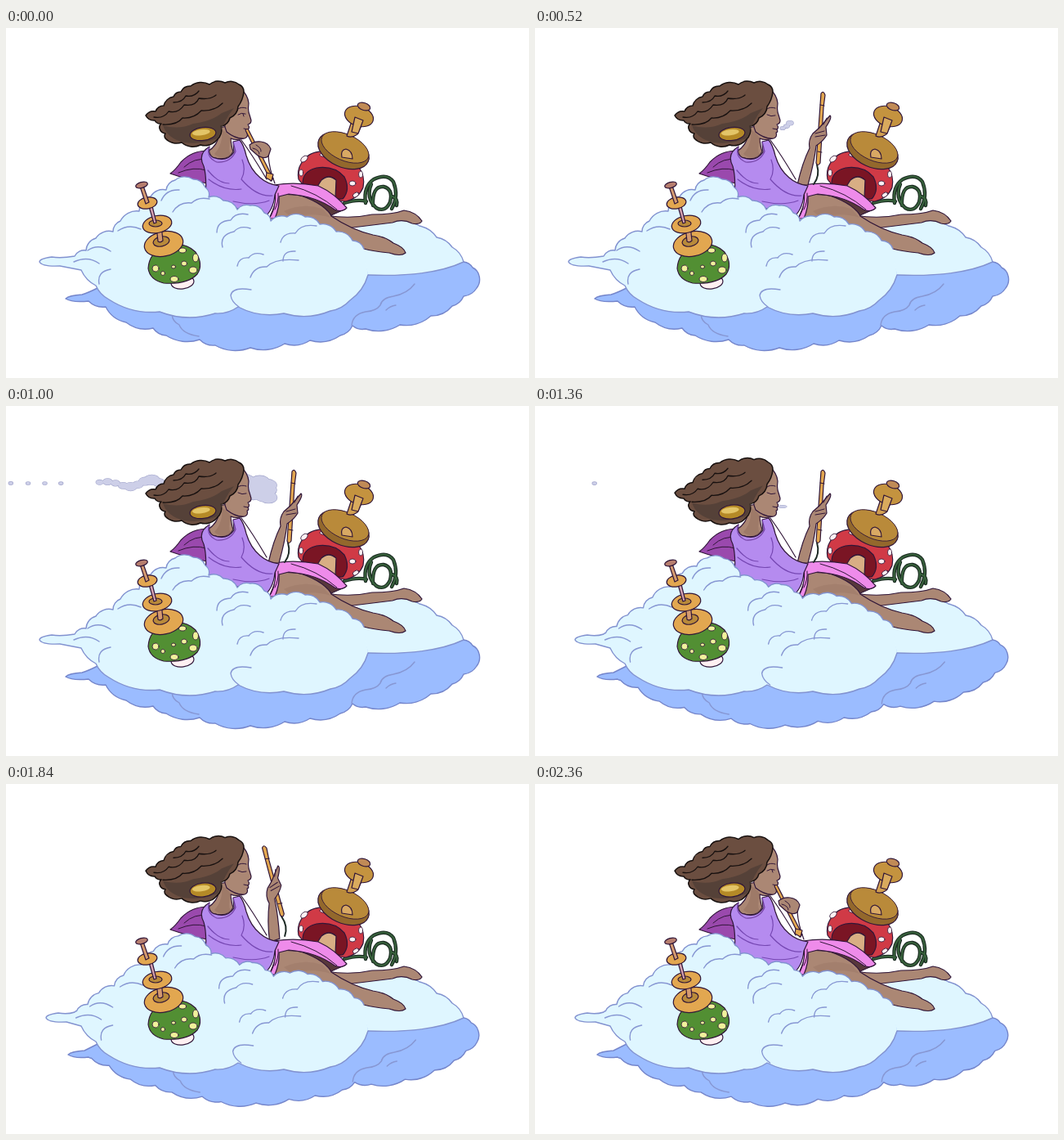
Write an HTML page that moves like this. It is 640 px wide and 428 px high and loops after 2400 ms.

```html
<!DOCTYPE html>
<html lang="en">
<head>
<meta charset="utf-8">
<title>Dreaming on a cloud</title>
<style>
html, body { margin: 0; width: 100%; height: 100%; overflow: hidden; background: #fff; }
svg { display: block; width: 640px; height: 428px; }
path, ellipse { stroke-linejoin: round; stroke-linecap: round; }
.ink { stroke: #301638; stroke-width: 1.2; }
.line { fill: none; stroke: #301638; stroke-width: 1; }
.light { fill: #dff6ff; stroke: #8292d0; stroke-width: 1.4; }
.shade { fill: #9bbcff; stroke: #7586cb; stroke-width: 1.4; }
.fold { fill: none; stroke: #8797d3; stroke-width: 1.4; }
.skin { fill: #ab8774; }
.dusk { fill: #8c6757; }
.gold { fill: #e2a750; }
.brass { fill: #b98a3a; }
.white { fill: #fff0f2; }
.hair { fill: #6b4e40; stroke: #17100f; stroke-width: 1.5; }
</style>
</head>
<body>
<svg viewBox="0 0 640 428">
  <path id="smokeEdge" fill="#a2a5cb"/>
  <path id="smoke" fill="#cdcfe8"/>

  <path id="shade" class="shade"/>
  <path id="shadeFold" class="fold" d="M204 347q-3 10 8 16q4 11 24 14M423 364q1-14 17-17q13-1 18-8q2-9 16-11q17-3 26-15M465 345q5-5 12-6"/>
  <path id="back" class="light"/>

  <!-- hose coil -->
  <g fill="none" stroke="#1b2b22" stroke-width="4.4">
    <path id="coil" d="M414 214Q430 209 441 212M440 214Q437 194 450 185Q466 177 474 188Q481 205 472 221M449 217Q448 193 462 194Q474 197 470 213Q464 226 453 220Q440 208 447 191M473 206Q480 209 478 217"/>
    <use href="#coil" stroke="#37603b" stroke-width="2.2"/>
  </g>

  <!-- red mushroom pipe -->
  <g class="ink">
    <path d="M358 185Q356 174 361 166Q370 150 390 151Q417 154 431 169Q440 181 437 195Q432 208 416 212Q376 211 358 185Z" fill="#d03a46"/>
    <path d="M363 190Q363 175 380 171Q402 168 414 182Q422 198 412 209Q380 211 363 190Z" fill="#7a1524"/>
    <path d="M379 197L386 186Q395 178 404 186L403 208Z" fill="#d8ae84"/>
    <g class="white" stroke-width=".8">
      <ellipse cx="365" cy="160" rx="5" ry="3" transform="rotate(-40 365 160)"/>
      <ellipse cx="390" cy="155" rx="6" ry="2.5"/>
      <ellipse cx="421" cy="167" rx="5" ry="3.5" transform="rotate(35 421 167)"/>
      <ellipse cx="434" cy="179" rx="2.5" ry="4"/>
      <ellipse cx="424" cy="190" rx="4" ry="3"/>
      <ellipse cx="361" cy="177" rx="2.5" ry="4"/>
      <ellipse cx="428" cy="204" rx="4" ry="2.5" transform="rotate(-35 428 204)"/>
    </g>
    <ellipse cx="413" cy="150" rx="33" ry="20" transform="rotate(24 413 150)" fill="#93682c"/>
    <ellipse cx="415" cy="146" rx="31" ry="16" transform="rotate(24 415 146)" class="brass" stroke-width=".8"/>
    <path d="M411 158Q409 149 416 148Q424 150 424 160Z" fill="#d9a963"/>
    <path d="M417 132L424 111L437 115L430 130Q423 135 417 132Z" fill="#d2a052"/>
    <ellipse cx="432" cy="108" rx="18" ry="12" transform="rotate(18 432 108)" fill="#c4933f"/>
    <path d="M423 127L427 109L437 113L431 129Z" fill="#d9aa5d"/>
    <ellipse cx="438" cy="96" rx="8" ry="4.5" transform="rotate(18 438 96)" fill="#c08a56"/>
  </g>

  <!-- dreamer -->
  <g class="ink">
    <path d="M247 150Q227 150 214 164Q207 174 201 178Q224 186 246 190Z" fill="#9a49ad"/>
    <path d="M218 170Q231 158 246 161M211 177Q230 169 245 174" class="line"/>
    <path d="M392 229Q421 234 448 228Q474 228 487 223Q502 225 509 236Q506 241 497 239Q485 233 473 238L416 245Z" class="skin"/>
    <path d="M323 231Q330 215 333 204Q349 202 367 206Q390 211 398 230Q423 247 449 253Q464 255 474 263Q487 268 489 275Q483 280 469 275Q449 273 438 270L395 250L345 242Z" class="skin"/>
    <path d="M340 224Q363 213 387 221L397 232Q377 225 349 231Z" class="dusk" stroke="none" opacity=".25"/>
    <path d="M354 203Q390 200 414 222L398 229Q386 212 354 203Z" fill="#57383a"/>
    <path d="M322 233Q333 216 328 192Q354 188 382 193Q402 202 417 220Q411 226 402 222Q381 206 346 203L334 206Q335 219 329 233Z" fill="#ee8bea"/>
    <path d="M349 193Q381 201 405 222M329 222Q334 212 333 202" class="line"/>
    <path d="M261 122L295 115L291 135Q281 138 275 135Q276 146 278 151Q272 164 252 158L247 151Q262 142 261 122Z" class="skin"/>
    <path d="M264 124Q274 130 276 138Q270 146 276 158Q260 160 255 154Q266 142 264 124Z" class="dusk" stroke="none" opacity=".4"/>
    <path d="M288 75Q296 82 297 92Q296 98 297 103Q299 109 300 113Q300 117 296 118Q299 122 296 124Q298 127 295 128Q297 133 292 135Q281 136 270 127Q264 115 273 103Z" class="skin"/>
    <path d="M291 123L296 124M284 99Q288 96 294 98" class="line"/>
    <path id="eyeOpen" d="M284 106Q288 103 293 105M290 105L291 108" class="line"/>
    <path id="eyeShut" d="M284 106Q289 109 294 107" class="line"/>
  </g>

  <g id="armOut" class="ink">
    <path d="M341 191Q349 181 345 167" fill="none" stroke="#1c2a25" stroke-width="2"/>
    <path d="M350 80Q353 76 355 82L353 97L349 165Q346 170 344 165L349 94Z" class="gold"/>
    <path d="M321 192Q327 165 336 147Q334 137 340 129L348 122L361 107Q364 109 356 121L357 131Q353 138 344 144Q342 163 334 192Z" class="skin"/>
    <path d="M343 129L354 126M343 133L355 131M353 118L357 110M349 94L354 95M346 151L351 152" class="line"/>
  </g>
  <g id="armIn" class="ink">
    <path d="M293 125Q295 122 297 125L327 184L324 187Z" class="gold"/>
    <path d="M298 143Q304 138 312 139Q321 140 324 148L321 157Q315 161 307 155L299 148Z" class="skin"/>
    <path d="M306 143Q313 147 312 151M302 147Q310 149 310 154" class="line"/>
    <path d="M321 156Q322 172 329 190" fill="none"/>
    <path d="M319 177L327 179L325 187L318 183Z" class="gold"/>
  </g>

  <g class="ink">
    <path d="M249 145Q234 154 242 169Q246 183 244 207L315 232Q327 224 329 204L334 193Q320 191 311 183Q299 173 294 156Q291 143 286 137L278 139L279 152Q270 165 253 158Q247 154 249 145Z" fill="#b58bef"/>
    <path d="M249 145Q244 158 258 164Q275 165 281 151L278 139" fill="none" stroke="#7443a6"/>
    <path d="M248 185Q267 200 288 197M247 174Q260 190 273 190M289 161Q294 174 288 185Q307 207 326 205M278 212Q304 218 322 211" fill="none" stroke="#7647b3"/>
    <path d="M288 137Q302 156 319 185" fill="none"/>
  </g>

  <path id="hair" class="hair"/>
  <g id="strands">
    <path d="M192 119Q211 125 229 117Q252 114 264 104L279 98Q267 112 260 134Q242 143 218 140Q197 135 192 119Z" fill="#4c3c35" opacity=".7"/>
    <path d="M181 109Q193 111 199 102Q211 105 218 94Q232 96 236 86Q250 88 257 82M192 118Q209 119 216 110Q230 111 239 101Q255 102 265 92M205 91Q216 91 220 83Q230 85 236 77" fill="none" stroke="#17100f" stroke-width="1.3"/>
  </g>
  <g id="ring">
    <ellipse rx="16" ry="8" class="ink" fill="#b58a27"/>
    <ellipse cx="-2" cy="-2" rx="11" ry="3.5" fill="#e3c568"/>
  </g>

  <path id="front" class="light"/>
  <path id="wisps" class="light"/>
  <path id="folds" class="fold" d="M190 211q6-14 22-13M204 225q8-13 23-11q8-8 22-5M258 250q0-14 17-15q6-10 21-7M265 268q-4-15 14-19q7-8 20-4M283 291q2-11 14-10q6-8 18-4M299 305q5-14 20-13q11-11 39-8M336 262q3-12 18-11q7-12 26-9M339 285q0-13 15-12M300 320q-23-4-25 7q1 8 10 14M137 248q13-9 28-2M100 272q13-9 28 1M83 286q17-8 31 2M114 313q-3-15 14-18"/>

  <!-- green mushroom pipe -->
  <g class="ink" stroke-width="1.5">
    <ellipse cx="216" cy="311" rx="14" ry="8" class="white" transform="rotate(-8 216 311)"/>
    <path d="M174 294Q175 275 194 267Q218 260 232 274Q242 289 234 301Q222 314 193 312Q176 308 174 294Z" fill="#528f33"/>
    <g fill="#f0f19b" stroke-width=".8">
      <ellipse cx="183" cy="294" rx="4" ry="4"/><ellipse cx="205" cy="292" rx="2.5" ry="2"/>
      <ellipse cx="218" cy="288" rx="3.5" ry="3"/><ellipse cx="232" cy="281" rx="3.5" ry="5"/>
      <ellipse cx="229" cy="296" rx="5" ry="4"/><ellipse cx="206" cy="307" rx="5" ry="3.5"/>
      <ellipse cx="192" cy="300" rx="2.5" ry="2.5"/><ellipse cx="216" cy="272" rx="4.5" ry="3"/>
    </g>
    <ellipse cx="193" cy="264" rx="24" ry="15" class="gold" transform="rotate(-12 193 264)"/>
    <ellipse cx="190" cy="261" rx="10" ry="6" class="brass" transform="rotate(-12 190 261)"/>
    <path d="M184 242L190 241L192 260Q189 263 186 261Z" fill="#d49a70"/>
    <ellipse cx="185" cy="240" rx="18" ry="10.5" class="gold" transform="rotate(-12 185 240)"/>
    <ellipse cx="183" cy="239" rx="8" ry="4" class="brass"/>
    <path d="M174 215L178 214L184 238L181 239Z" fill="#d6a2b0"/>
    <ellipse cx="173" cy="214" rx="12" ry="7" class="gold" transform="rotate(-10 173 214)"/>
    <path d="M164 194L168 193L175 213L171 215Z" fill="#d49a70"/>
    <ellipse cx="166" cy="192" rx="7.5" ry="3.5" fill="#b77e6e" transform="rotate(-15 166 192)"/>
  </g>
</svg>
<script>
const $ = id => document.getElementById(id);
const pairs = s => s.split(' ').map(p => p.split(',').map(Number));

const edge = {
  back: pairs('560,286 546,268 527,256 506,242 472,236 430,238'),
  top: pairs('438,270 424,260 404,249 384,240 366,231 344,231 324,236 316,226 299,217 283,222 266,211 248,207 244,195 229,185 207,186 196,198 177,206 163,224 140,236 131,249 110,257 98,272 84,279'),
  low: pairs('92,296 110,315 126,332 188,347 256,349 284,341 340,349 397,346 421,333 443,302'),
  base: pairs('101,334 122,341 147,360 180,367 196,376 237,381 256,388 299,391 341,386 372,382 409,376 424,364 440,368 482,363 520,352 546,340 560,328 576,318 579,303 571,293 560,286'),
  hair: pairs('291,78 285,69 268,67 249,69 226,71 214,78 205,84 193,95 183,102 171,107 182,113 190,117 188,123 195,129 195,135 215,140 238,143 258,137 263,120 274,110 284,96')
};

// Six drawings, each held for 80 ms
const tail = [[41, 286], [32, 285], [68, 298], [62, 292], [56, 289], [49, 286]];
const lowTail = [73, 55, 83, 81, 79, 76];
const lift = [0, -7, -5, -3, -2, -1.5];
const hoop = [8, 4.5, 3.5, 5, 7, 8.5];

// Cusps drift towards the next one, ends stay put
function slide(pts, k) {
  const mid = pts.slice(1).map(([x, y], i) =>
    [pts[i][0] + (x - pts[i][0]) * k, pts[i][1] + (y - pts[i][1]) * k]);
  return [pts[0], ...mid, pts.at(-1)];
}
const slideBack = (pts, k) => slide([...pts].reverse(), k).reverse();

function scallop(pts, round) {
  return pts.map(([x, y], i) => {
    if (!i) return `L${x} ${y}`;
    const r = Math.hypot(x - pts[i - 1][0], y - pts[i - 1][1]) * round;
    return `A${r} ${r} 0 0 0 ${x} ${y}`;
  }).join('');
}

const oval = (x, y, rx, ry) =>
  `M${x - rx} ${y}a${rx} ${ry} 0 1 0 ${2 * rx} 0a${rx} ${ry} 0 1 0 ${-2 * rx} 0z`;

function drawCloud(n) {
  const k = n / 6, [tx, ty] = tail[n], lx = lowTail[n];
  $('back').setAttribute('d', 'M443 302Q520 305 560 286' + scallop(edge.back, 1.3));
  $('front').setAttribute('d', 'M438 270' + scallop(slide(edge.top, k), 0.85) +
    `Q${tx + 26} ${ty - 4} ${tx + 15} ${ty - 6}Q${tx} ${ty - 4} ${tx} ${ty}` +
    `Q${tx + 3} ${ty + 6} ${tx + 25} ${Math.min(ty + 5, 297)}` + scallop(edge.low, 1.5));
  $('shade').setAttribute('d', `M112 318Q100 324 ${lx + 20} 326Q${lx + 4} 327 ${lx} 331` +
    `Q${lx + 8} 336 101 334` + scallop(slideBack(edge.base, k), 1.15));
  const age = n - 2, s = 1 - age * 0.25;
  $('wisps').setAttribute('d', age < 0 || age > 2 ? '' :
    oval(27 - age * 8, 284, 8 * s, 2 * s) + oval(53 - age * 13, 331, 12 * s, 3 * s));
  const drift = 3 * Math.sin(k * 2 * Math.PI);
  $('folds').setAttribute('transform', `translate(${-drift} 0)`);
  $('shadeFold').setAttribute('transform', `translate(${-drift / 2} 0)`);
}

function drawHair(n) {
  const pts = edge.hair.map(([x, y]) => {
    const w = Math.min(1, (291 - x) / 25) * (y < 108 ? 1 : 0.1);
    return [x, y + lift[n] * w * (x < 190 ? 0.5 : 1)];
  });
  $('hair').setAttribute('d', 'M291 78' + scallop(pts, 0.9) + 'Q290 88 291 78Z');
  $('strands').setAttribute('transform', `translate(0 ${lift[n] * 0.5})`);
  $('ring').setAttribute('transform',
    `translate(${241 - (n % 5 ? 2 : 0)} 129.5) rotate(${n % 5 ? -14 : -7}) scale(1 ${hoop[n] / 8})`);
}

// A few early puffs run ahead of the main stream
function drawSmoke(t) {
  const puffs = [];
  for (let i = 0; i < 46; i++) {
    const early = i < 4;
    const age = t - (early ? 484 + i * 14 : 530 + i * 8);
    if (age < 0 || age > (early ? 540 : 474)) continue;
    const grown = Math.sin(Math.PI * Math.min(1, age / 470));
    const x = 300 + 0.4 * age - 0.00188 * age * age;
    const y = 124 - 30 * (1 - Math.exp(-age / 120)) + Math.sin(i * 7.3) * 9 * grown;
    const r = 2 + (early ? 6 : 9) * grown * (0.85 + 0.2 * Math.sin(i * 4.1));
    puffs.push([x, y, r]);
  }
  const d = grow => puffs.map(([x, y, r]) => oval(x, y, r * 1.3 + grow, r * 0.85 + grow)).join('') +
    (t >= 1200 && t < 1400 ? oval(303, 123, 5 + grow, 1.5 + grow) : '');
  $('smokeEdge').setAttribute('d', d(0.6));
  $('smoke').setAttribute('d', d(0));
}

const ramp = (t, a, b) => Math.max(0, Math.min(1, (t - a) / (b - a)));

function drawPose(t) {
  const k = ramp(t, 280, 440) - ramp(t, 1760, 1920);
  const show = (id, on) => $(id).setAttribute('display', on ? 'inline' : 'none');
  show('armIn', k <= 0);
  show('armOut', k > 0);
  show('eyeOpen', k < 0.5);
  show('eyeShut', k >= 0.5);
  $('armOut').setAttribute('transform', `rotate(${-38 * (1 - k * k * (3 - 2 * k))} 326 188)`);
}

let start, last = -1;
function tick(now) {
  start ??= now;
  const t = Math.floor((now - start) % 2400 / 40) * 40;
  if (t !== last) {
    const n = Math.floor(t % 480 / 80);
    drawCloud(n);
    drawHair(n);
    drawSmoke(t);
    drawPose(t);
    last = t;
  }
  requestAnimationFrame(tick);
}
requestAnimationFrame(tick);
</script>
</body>
</html>
```
